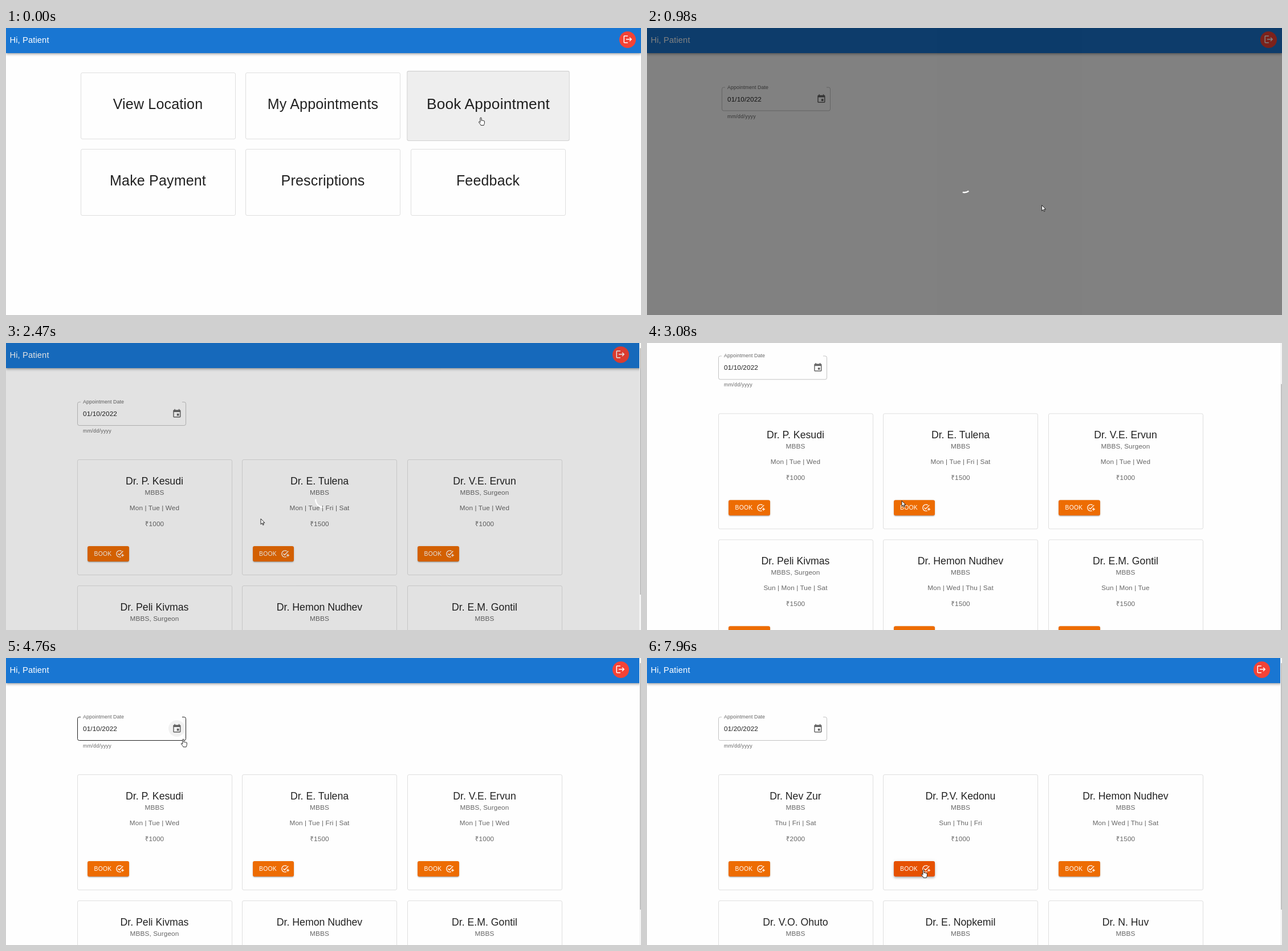
An HTML page that plays this animation: 1114 px wide and 503 px high, repeating every 8 s.

```html
<!DOCTYPE html>
<html lang="en">
<head>
<meta charset="utf-8">
<title>Book an appointment</title>
<style>
html, body { margin: 0; width: 100%; height: 100%; overflow: hidden; background: #fefefe; }
body { position: relative; font-family: "Liberation Sans", Arial, sans-serif; color: rgba(0,0,0,.87); }
div, svg { position: absolute; }
svg { overflow: visible; }
#stage { left: 0; top: 0; width: 1114px; height: 503px; overflow: hidden; background: #fefefe; }
#page { left: 0; top: 0; width: 1114px; height: 670px; }
#bar { left: 0; top: 0; width: 1114px; height: 43.5px; background: #1976d2; color: #fff;
  box-shadow: 0 1.5px 3px -.7px rgba(0,0,0,.2), 0 3px 3.7px rgba(0,0,0,.14), 0 .7px 7.4px rgba(0,0,0,.12); }
#hi { left: 6.5px; top: 10.5px; font-size: 14.72px; line-height: 20px; letter-spacing: .11px; white-space: nowrap; }
#out { left: 1076px; top: 5.5px; width: 29.4px; height: 29.4px; border-radius: 50%; background: #f44336; }
#out svg { left: 5.8px; top: 5.8px; }
.card { box-sizing: border-box; width: 272px; border: 1px solid rgba(0,0,0,.12); border-radius: 3px; }
.tile { height: 117px; }
.tile.hot { background: #eee; transform: scale(1.05); }
.doc { height: 203px; }
.t { left: 0; width: 100%; text-align: center; line-height: 20px; white-space: nowrap; }
.tile .t { top: 43.5px; font-size: 25px; letter-spacing: .18px; }
.doc .t { font-size: 11.78px; letter-spacing: .11px; color: rgba(0,0,0,.6); }
.doc .name { font-size: 17.7px; letter-spacing: 0; color: rgba(0,0,0,.87); }
.btn { left: 17.5px; top: 151px; width: 72.5px; height: 27px; border-radius: 3px; background: #ed6c02; color: #fff;
  box-shadow: 0 2px 1.5px -1.5px rgba(0,0,0,.2), 0 1.5px 1.5px rgba(0,0,0,.14), 0 .7px 3.7px rgba(0,0,0,.12); }
.btn span { position: absolute; left: 11.5px; top: 3.5px; font-size: 10.3px; line-height: 20px; letter-spacing: .29px; }
.btn svg { left: 49px; top: 6px; }
#field { left: 125px; top: 102.5px; }
#field div { line-height: 12px; white-space: nowrap; }
#label { left: 10px; top: -5.3px; font-size: 8.83px; letter-spacing: .08px; color: rgba(0,0,0,.6); }
#date { left: 10px; top: 15px; font-size: 11.78px; letter-spacing: .11px; }
#hint { left: 10px; top: 45.5px; font-size: 8.83px; letter-spacing: .29px; color: rgba(0,0,0,.6); }
#glow { left: 160px; top: 6.5px; width: 29px; height: 29px; border-radius: 50%; background: rgba(0,0,0,.06); }
#shade { left: 0; top: 0; width: 1114px; height: 503px; background: rgba(0,0,0,.5); }
#pop { left: 84px; top: 144px; width: 235.5px; height: 263.5px; border-radius: 3px; background: #fff; transform-origin: 50% 0;
  box-shadow: 0 3.7px 3.7px -2px rgba(0,0,0,.2), 0 6px 7.4px .7px rgba(0,0,0,.14), 0 2px 10px 1.5px rgba(0,0,0,.12); }
#month { left: 17.7px; top: 12.8px; font-size: 11.78px; line-height: 20px; letter-spacing: .11px; white-space: nowrap; }
.day { width: 26.5px; height: 26.5px; border-radius: 50%; font-size: 8.83px; line-height: 26.5px; text-align: center; }
.week { color: rgba(0,0,0,.6); }
.on { background: #1976d2; color: #fff; }
#scroll { left: 1111px; top: 0; width: 3px; height: 503px; background: #f4f4f4; }
#thumb { left: 1px; top: 9px; width: 2px; height: 432px; background: #c1c1c1; }
#cursor { left: 0; top: 0; }
</style>
</head>
<body>
<div id="stage">
  <div id="page">
    <div id="bar"><div id="hi">Hi, Patient</div><div id="out"></div></div>
    <div id="home"></div>
    <div id="booking">
      <div id="field">
        <svg width="191" height="42" fill="none"><path id="outline" d="M6 .5H3.5a3 3 0 0 0-3 3V38.5a3 3 0 0 0 3 3H187.5a3 3 0 0 0 3-3V3.5a3 3 0 0 0-3-3H184"/></svg>
        <div id="label">Appointment Date</div>
        <div id="date"></div>
        <div id="hint">mm/dd/yyyy</div>
        <div id="glow"></div>
      </div>
      <div id="first"></div>
      <div id="second"></div>
    </div>
  </div>
  <div id="shade">
    <svg id="spin" style="left:542.3px;top:259.8px" width="29.4" height="29.4" viewBox="22 22 44 44">
      <circle id="arc" cx="44" cy="44" r="20.2" fill="none" stroke="#fff" stroke-width="3.6"/>
    </svg>
  </div>
  <div id="pop">
    <div id="month">January 2022</div>
    <svg width="235" height="46" fill="rgba(0,0,0,.54)">
      <path d="M96 21.5h7.4l-3.7 3.7z"/>
      <path d="M173.5 19l-4 4 4 4M212.5 19l4 4-4 4" fill="none" stroke="rgba(0,0,0,.54)" stroke-width="1.5"/>
    </svg>
  </div>
  <div id="scroll"><div id="thumb"></div></div>
  <svg id="cursor" width="12" height="16" fill="#fff" stroke="#111" stroke-width=".9" stroke-linejoin="round">
    <path id="arrow" d="M.5.5V10.3L2.8 8.2 4.3 11.6 5.8 11 4.3 7.7H7.4Z"/>
    <path id="hand" transform="translate(-4.3 -.7)" d="M3.2 9.2V1.8a1.1 1.1 0 0 1 2.2 0V6a1 1 0 0 1 1.9.2 1 1 0 0 1 1.8.4.9.9 0 0 1 1.6.7V10c0 2-.9 2.7-1.2 4.3H4.4C4 12.6 2 11 .9 9.2.3 8.1 1.5 7.4 2.2 8.2z"/>
  </svg>
</div>
<script>
const LOOP = 8000;
const $ = id => document.getElementById(id);
const ICON = {
  out: 'M17 7l-1.41 1.41L18.17 11H8v2h10.17l-2.58 2.58L17 17l5-5zM4 5h8V3H4c-1.1 0-2 .9-2 2v14c0 1.1.9 2 2 2h8v-2H4V5z',
  event: 'M17 12h-5v5h5v-5zM16 1v2H8V1H6v2H5c-1.11 0-1.99.9-1.99 2L3 19c0 1.1.89 2 2 2h14c1.1 0 2-.9 2-2V5c0-1.1-.9-2-2-2h-1V1h-2zm3 18H5V8h14v11z',
  task: 'M22 5.18 10.59 16.6l-4.24-4.24 1.41-1.41 2.83 2.83 10-10L22 5.18zM12 20c-4.41 0-8-3.59-8-8s3.59-8 8-8c1.57 0 3.04.46 4.28 1.25l1.45-1.45C16.1 2.67 14.13 2 12 2 6.48 2 2 6.48 2 12s4.48 10 10 10c1.73 0 3.36-.44 4.78-1.22l-1.5-1.5c-1 .46-2.11.72-3.28.72zm7-5h-3v2h3v3h2v-3h3v-2h-3v-3h-2v3z'
};
const icon = (name, size, fill, style = '') =>
  `<svg width="${size}" height="${size}" viewBox="0 0 24 24" fill="${fill}" style="${style}"><path d="${ICON[name]}"/></svg>`;
const add = (id, html) => $(id).insertAdjacentHTML('beforeend', html);

// Static content
const place = (i, x, y, dy) => `left:${x + i % 3 * 289.5}px;top:${y + (i > 2) * dy}px`;

add('out', icon('out', 17.7, '#fff'));
add('field', icon('event', 17.7, 'rgba(0,0,0,.6)', 'left:165.5px;top:12px'));
['View Location', 'My Appointments', 'Book Appointment', 'Make Payment', 'Prescriptions', 'Feedback'].forEach((name, i) =>
  add('home', `<div class="card tile${i === 2 ? ' hot' : ''}" style="${place(i, 130.5, 78, 134)}"><div class="t">${name}</div></div>`));

const line = (y, text, cls = '') => `<div class="t ${cls}" style="top:${y - 10}px">${text}</div>`;
function doctors(id, list) {
  list.forEach(([name, degree, days, fee], i) => add(id,
    `<div class="card doc" style="${place(i, 124.5, 204, 221)}">` +
    line(36.5, 'Dr. ' + name, 'name') + line(57.3, degree) +
    line(84, days.split(' ').join(' | ')) + line(111.5, '₹' + fee) +
    `<div class="btn"><span>BOOK</span>${icon('task', 15, '#fff')}</div></div>`));
}
doctors('first', [
  ['P. Kesudi', 'MBBS', 'Mon Tue Wed', 1000],
  ['E. Tulena', 'MBBS', 'Mon Tue Fri Sat', 1500],
  ['V.E. Ervun', 'MBBS, Surgeon', 'Mon Tue Wed', 1000],
  ['Peli Kivmas', 'MBBS, Surgeon', 'Sun Mon Tue Sat', 1500],
  ['Hemon Nudhev', 'MBBS', 'Mon Wed Thu Sat', 1500],
  ['E.M. Gontil', 'MBBS', 'Sun Mon Tue', 1500]
]);
doctors('second', [
  ['Nev Zur', 'MBBS', 'Thu Fri Sat', 2000],
  ['P.V. Kedonu', 'MBBS', 'Sun Thu Fri', 1000],
  ['Hemon Nudhev', 'MBBS', 'Mon Wed Thu Sat', 1500],
  ['V.O. Ohuto', 'MBBS', 'Tue Thu Sat', 1000],
  ['E. Nopkemil', 'MBBS', 'Wed Thu Fri', 1500],
  ['N. Huv', 'MBBS', 'Mon Thu', 1000]
]);

const cell = (col, y, text, cls, id = '') =>
  add('pop', `<div class="day ${cls}" id="${id}" style="left:${104.5 + (col - 3) * 29.44}px;top:${y - 13.25}px">${text}</div>`);
[...'SMTWTFS'].forEach((d, i) => cell(i, 54.5, d, 'week'));
for (let d = 1; d <= 31; d++) cell((d + 5) % 7, 83.9 + Math.floor((d + 5) / 7) * 29.44, d, '', 'd' + d);

// Motion
function bezier(x1, x2, y2, x) {
  if (x <= 0 || x >= 1) return x <= 0 ? 0 : 1;
  let lo = 0, hi = 1, u;
  for (let i = 0; i < 24; i++) {
    u = (lo + hi) / 2;
    const v = 1 - u;
    3 * v * v * u * x1 + 3 * v * u * u * x2 + u * u * u < x ? lo = u : hi = u;
  }
  return 3 * (1 - u) * u * u * y2 + u * u * u;
}
const fade = (t, start, span) => bezier(.4, .2, 1, (t - start) / span);
const inOut = x => bezier(.42, .58, 1, x);
const within = (t, a, b) => t >= a && t < b;
const show = (id, on) => $(id).style.display = on ? '' : 'none';

function track(keys, t) {
  let i = 1;
  while (i < keys.length - 1 && t >= keys[i][0]) i++;
  const a = keys[i - 1], b = keys[i];
  const k = Math.min(1, Math.max(0, (t - a[0]) / (b[0] - a[0])));
  return a.slice(1).map((v, j) => v + (b[j + 1] - v) * k);
}
const POINTER = [
  [0, 833, 157], [240, 833, 157], [440, 822, 145], [579, 822, 145], [580, 829, 148], [730, 829, 148],
  [980, 692.5, 310], [1300, 575, 329], [1580, 520, 328], [2330, 446.5, 307.5], [2660, 446.5, 307.5],
  [3080, 446.5, 276], [3340, 442, 264], [3600, 442, 264], [4000, 372, 218], [4400, 311, 168],
  [4600, 301, 126], [4680, 301, 126], [4760, 311, 142], [4900, 296, 185], [5240, 250, 335],
  [5310, 250, 335], [5770, 232, 311], [5990, 232, 311], [6470, 392.5, 324.5], [6670, 543, 365],
  [7100, 755, 341], [7490, 560, 362], [7700, 495, 373], [7960, 485, 371.5]
];
const SCROLL = [[2700, 0], [3080, 80.5], [3340, 121], [3600, 121], [4000, 0]];
const OPEN = 790, LOADED = 2373, PICK = 5920, CLOSE = 5990, SWAP = 6130;
const bookBtn = $('second').children[1].querySelector('.btn');

function draw(t) {
  const loaded = t >= LOADED, picked = t >= PICK;
  show('home', t < OPEN);
  show('booking', t >= OPEN);
  show('first', loaded && t < SWAP);
  show('second', t >= SWAP);
  show('scroll', loaded);

  const [y] = track(SCROLL, t);
  $('page').style.transform = `translateY(${-y}px)`;
  $('thumb').style.transform = `translateY(${y * .78}px)`;
  $('out').style.left = (loaded ? 1063.5 : 1076) + 'px';
  $('field').style.transform = loaded ? 'none' : 'translate(6px,.5px)';

  const dim = fade(t, OPEN, 225) - fade(t, LOADED, 195);
  show('shade', dim > 0);
  $('shade').style.opacity = dim;
  const turn = Math.max(0, t - OPEN) / 1400 % 1;
  const grow = inOut(turn * 2), slide = inOut(turn * 2 - 1);
  $('spin').style.transform = `rotate(${turn * 360}deg)`;
  $('arc').style.strokeDasharray = `${1 + 99 * grow} 200`;
  $('arc').style.strokeDashoffset = -15 * grow - 110 * slide;

  const hover = within(t, 4480, 4830);
  $('outline').setAttribute('stroke', `rgba(0,0,0,${hover ? .87 : .23})`);
  $('glow').style.opacity = fade(t, 4540, 110) - fade(t, 4740, 110);
  $('date').textContent = picked ? '01/20/2022' : '01/10/2022';
  $('d10').classList.toggle('on', !picked);
  $('d20').classList.toggle('on', picked);
  const pop = fade(t, 4800, 250) - fade(t, CLOSE, 220);
  show('pop', pop > 0);
  $('pop').style.opacity = pop;
  $('pop').style.transform = `scale(${.75 + .25 * pop},${.5625 + .4375 * pop})`;

  const hot = fade(t, 7660, 200);
  bookBtn.style.background = `rgb(${237 - 7 * hot},${108 - 27 * hot},${2 - 2 * hot})`;
  bookBtn.style.boxShadow = hot ? '0 1.5px 3px -.7px rgba(0,0,0,.2), 0 3px 3.7px rgba(0,0,0,.14), 0 .7px 7.4px rgba(0,0,0,.12)' : '';

  const [cx, cy] = track(POINTER, t);
  const hand = t < 730 || within(t, 4540, 4820) || within(t, 4980, 6050) || t >= 7660;
  $('cursor').style.transform = `translate(${cx}px,${cy}px)`;
  show('hand', hand);
  show('arrow', !hand);
}

const begin = performance.now();
function tick() {
  draw((performance.now() - begin) % LOOP);
  requestAnimationFrame(tick);
}
tick();
</script>
</body>
</html>
```
